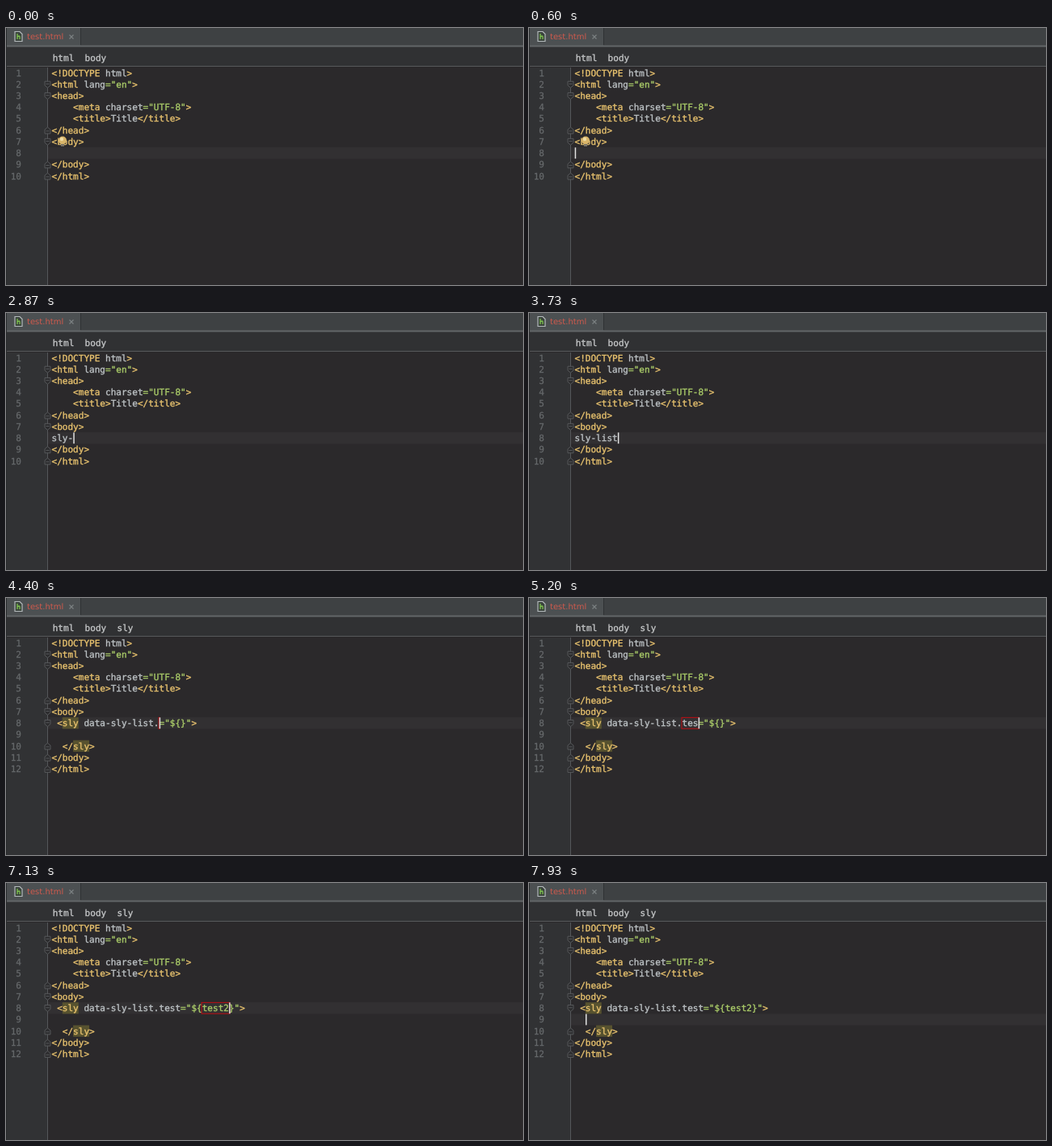
Recreate the animation shown at these times as an HTML page. Size 640 by 319 pixels, loop 8000 ms.

```html
<!DOCTYPE html>
<html lang="en">
<head>
<meta charset="UTF-8">
<title>Editor</title>
<style>
  html, body { margin: 0; width: 100%; height: 100%; overflow: hidden; background: #2b292b; }
  svg { display: block; width: 640px; height: 319px; }
  text { font: 11.05px "DejaVu Sans Mono", monospace; white-space: pre; text-rendering: geometricPrecision; }
  .tag { fill: #e8c26e; stroke: #e8c26e; stroke-width: .35px; }
  .value { fill: #a9ca68; stroke: #a9ca68; stroke-width: .35px; }
  .plain { fill: #bcc1c4; stroke: #bcc1c4; stroke-width: .35px; }
  .number { fill: #66696b; stroke: #66696b; stroke-width: .25px; text-anchor: end; }
  .crumb { fill: #c8cacb; stroke: #c8cacb; stroke-width: .3px; }
  .tab { font: 10px "DejaVu Sans", sans-serif; fill: #cf5a4d; }
  .fold { fill: #2d2d2f; stroke: #5b5d5f; stroke-width: .9px; }
</style>
</head>
<body>
<svg viewBox="0 0 640 319">
  <rect width="640" height="22" fill="#3e4143"/>
  <rect width="92" height="22" fill="#4c5052"/>
  <rect x="92" width="1" height="21" fill="#2f3234"/>
  <rect y="23" width="640" height="25" fill="#303133"/>
  <rect y="21.5" width="640" height="2" fill="#626668"/>
  <rect y="49" width="51" height="270" fill="#313234"/>
  <rect y="47" width="640" height="1" fill="#57595b"/>
  <rect width="1" height="319" fill="#292b2d"/>
  <path d="M11 4.5h6l3 3v9h-9z" fill="#39433b" stroke="#b4babc" stroke-width="1.2"/>
  <path d="M14 7v7M14 11q3-2 3 0v3" fill="none" stroke="#7fc34f" stroke-width="1.3"/>
  <text class="tab" x="26" y="14.4">test.html</text>
  <path d="M78.5 8.5l5 5m0-5l-5 5" stroke="#7b8082" stroke-width="1.2"/>
  <g id="editor"></g>
</svg>
<script>
const LOOP = 8000, LEFT = 56.5, CHAR = 6.65, ROW = 14.22;
const BULB_END = 870, EXPAND = 3930, NEXT_FIELD = 5600, LEAVE = 7530;

const abbreviation = { text: 'sly-list', times: [2200, 2400, 2530, 2730, 2930, 3130, 3270, 3400] };
const itemName = { text: 'test', times: [4800, 4930, 5130, 5270] };
const listName = { text: 'test2', times: [6470, 6670, 6870, 7000, 7130] };
const BLINK_START = 330;
const actions = [BLINK_START, ...abbreviation.times, EXPAND, ...itemName.times,
  NEXT_FIELD, ...listName.times, LEAVE];

const editor = document.getElementById('editor');
const colX = col => LEFT + col * CHAR;
const rowY = row => 48.6 + row * ROW;
const typed = ({ text, times }, t) => text.slice(0, times.filter(time => time <= t).length);
const escapeText = s => s.replace(/&/g, '&amp;').replace(/</g, '&lt;');
const label = (cls, x, y, s) => `<text class="${cls}" x="${x}" y="${y}">${escapeText(s)}</text>`;
const box = (x, y, w, h, fill) => `<rect x="${x}" y="${y}" width="${w}" height="${h}" fill="${fill}"/>`;

function stateAt(t) {
  const expanded = t >= EXPAND;
  const name = typed(itemName, t), list = typed(listName, t);
  const opening = ' <sly data-sly-list.';
  const body = expanded ? [`${opening}${name}="\${${list}}">`, '', '  </sly>'] : [typed(abbreviation, t)];
  const lines = ['<!DOCTYPE html>', '<html lang="en">', '<head>', '    <meta charset="UTF-8">',
    '    <title>Title</title>', '</head>', '<body>', ...body, '</body>', '</html>'];

  let row = 7, col = body[0].length, field = null;
  if (t >= LEAVE) {
    row = 8;
    col = 2;
  } else if (expanded) {
    const inList = t >= NEXT_FIELD;
    const start = opening.length + (inList ? name.length + 4 : 0);
    const length = (inList ? list : name).length;
    field = { start, length };
    col = start + length;
  }
  const lastAction = actions.filter(time => time <= t).pop();
  const caretOn = lastAction !== undefined && (t - lastAction) % 1000 < 500;
  return { lines, expanded, row, col, field, caretOn, bulb: t < BULB_END };
}

function drawLine(line, row) {
  const y = rowY(row) + 11;
  let out = label('number', 19, y, String(row + 1));
  for (const match of line.matchAll(/<[!\/]?\w+|>|="[^"]*"|[^<>=]+/g)) {
    const s = match[0];
    const cls = /^[<>]/.test(s) ? 'tag' : s[0] === '=' ? 'value' : 'plain';
    const indent = s.length - s.trimStart().length;
    out += label(cls, colX(match.index + indent), y, s.trim());
  }
  return out;
}

function drawFold(line, row) {
  const kind = line.match(/^ *<(\/?)(html|head|body|sly)/);
  if (!kind) return '';
  const flip = kind[1] ? -1 : 1;
  return `<g transform="translate(51.5 ${rowY(row) + 7.4}) scale(1 ${flip})">
    <path class="fold" d="M-3.5-4h7v5l-3.5 3l-3.5-3zM-2-.8h4"/></g>`;
}

function draw({ lines, expanded, row, col, field, caretOn, bulb }) {
  let out = box(52, rowY(row), 588, ROW, '#323032');
  if (expanded) {
    for (const [r, c] of [[7, 2], [9, 4]]) out += box(colX(c), rowY(r), 3 * CHAR, ROW, '#57522f');
  }
  out += box(51, 49, 1, 270, '#55575a');
  out += lines.map(drawLine).join('') + lines.map(drawFold).join('');
  ['html', 'body', 'sly'].slice(0, expanded ? 3 : 2)
    .forEach((s, i) => out += label('crumb', 57.7 + i * 6 * CHAR, 41.1, s));
  if (field) {
    out += `<rect x="${colX(field.start) - .5}" y="${rowY(row) + .2}" width="${field.length * CHAR + 1.5}"
      height="${ROW - .4}" fill="none" stroke="#c00d12"/>`;
  }
  if (caretOn) out += box(colX(col) + .2, rowY(row) + .2, 1.5, ROW - .4, '#e2e2e2');
  if (bulb) {
    out += `<circle cx="70" cy="139.5" r="5" fill="#d9b569"/>
      <circle cx="69" cy="138" r="2.2" fill="#efdca4"/>` + box(68, 144, 4, 3, '#777266');
  }
  return out;
}

let shown = '';
function frame(now) {
  const picture = draw(stateAt(now % LOOP));
  if (picture !== shown) editor.innerHTML = shown = picture;
  requestAnimationFrame(frame);
}
frame(0);
</script>
</body>
</html>
```
